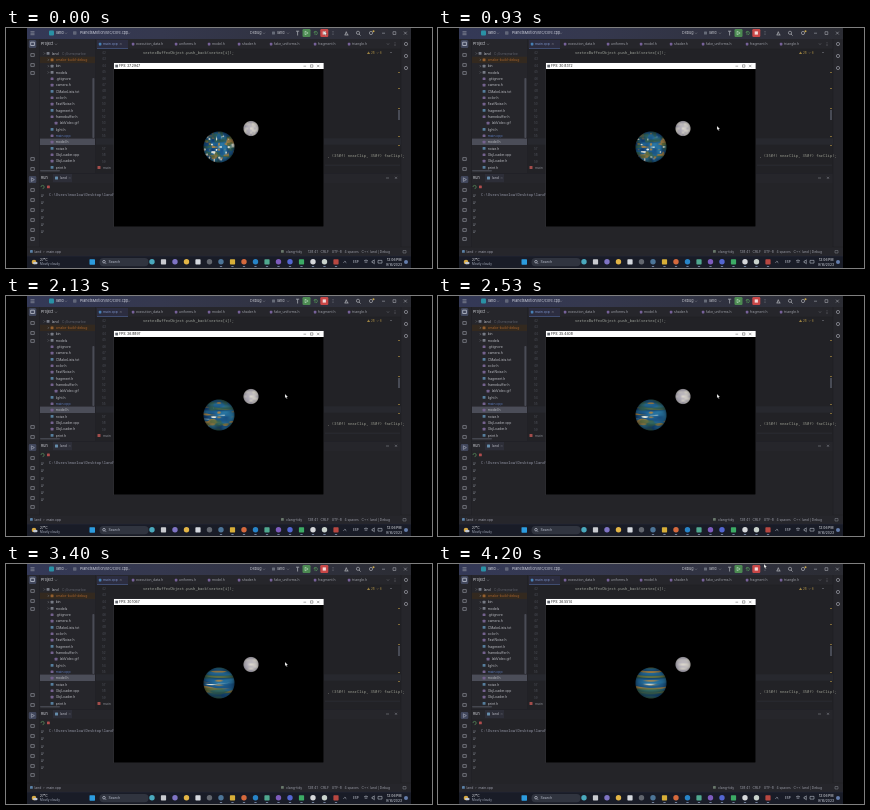
An HTML page with a canvas for the animation above (4.27 s loop, 426x240 px).

```html
<!DOCTYPE html>
<html lang="en">
<head>
<meta charset="utf-8">
<title>Planet demo</title>
<style>
html, body { margin: 0; width: 100%; height: 100%; overflow: hidden; background: #000; }
svg, canvas { position: absolute; left: 0; top: 0; display: block; width: 426px; height: 240px; }
text { font-family: Inter, "Open Sans", sans-serif; font-size: 3.4px; fill: #a4a6ae; white-space: pre; }
.code { font-family: "Noto Sans Mono", "DejaVu Sans Mono", monospace; font-size: 3.8px; }
#cursor { animation: roam 4.27s linear infinite; }
@keyframes roam {
  0%, 3% { transform: translate(318px, 3px); animation-timing-function: ease-in-out; }
  15%, 88% { transform: translate(279px, 98px); animation-timing-function: ease-in-out; }
  97%, 100% { transform: translate(326px, 0); }
}
</style>
</head>
<body>
<svg id="desk" viewBox="0 0 426 240">
  <defs>
    <linearGradient id="bar">
      <stop offset="0" stop-color="#343957"/>
      <stop offset=".35" stop-color="#35384e"/>
      <stop offset="1" stop-color="#2b2c33"/>
    </linearGradient>
  </defs>
  <g id="ide"></g>
  <g id="app">
    <rect x="107.5" y="34.7" width="210.5" height="164.3" fill="#303035"/>
    <rect x="108" y="35" width="209.6" height="6" fill="#fff"/>
    <rect x="108" y="41" width="209.6" height="157.6" fill="#000"/>
    <rect x="109.3" y="36.7" width="2.7" height="2.7" fill="#62666e"/>
    <text id="fps" x="113" y="39.4" style="fill:#222"></text>
    <path d="M297.5 38.2h2.6M304.5 36.8h2.4v2.4h-2.4zM311 36.8l2.4 2.4m0-2.4l-2.4 2.4" fill="none" stroke="#444" stroke-width=".45"/>
  </g>
</svg>
<canvas id="sky" width="852" height="480"></canvas>
<svg viewBox="0 0 426 240">
  <path id="cursor" d="M0 0v4.1l1-.9.7 1.5.7-.3-.7-1.5h1.3z" fill="#fff" stroke="#222" stroke-width=".25"/>
</svg>
<script>
const LOOP = 4270, STEPS = 64;
const ide = document.getElementById('ide');

function add(tag, attrs, body) {
  const el = document.createElementNS('http://www.w3.org/2000/svg', tag);
  for (const key in attrs) el.setAttribute(key, attrs[key]);
  if (body) el.textContent = body;
  ide.append(el);
  return el;
}
const box = (x, y, width, height, fill, rx = 0) => add('rect', { x, y, width, height, fill, rx });
const dot = (cx, cy, r, fill) => add('circle', { cx, cy, r, fill });
const ring = (cx, cy, r, stroke = '#b3b5bb') =>
  add('circle', { cx, cy, r, stroke, fill: 'none', 'stroke-width': .65 });
const line = (d, stroke = '#8c8e96', width = .6) =>
  add('path', { d, stroke, 'stroke-width': width, fill: 'none' });
const label = (x, y, words, fill = '#a4a6ae', size = 3.4) =>
  add('text', { x, y, style: `fill:${fill};font-size:${size}px` }, words);
const code = (x, y, words, fill = '#8d9098') =>
  add('text', { x, y, class: 'code', style: `fill:${fill}` }, words);
const chevron = (x, y) => line(`M${x} ${y}l1 1l1-1`, '#85878f', .5);

function drawFrame() {
  box(21, 0, 384, 240, '#26262b');
  box(90, 21, 305, 124, '#222226');
  box(34, 155, 361, 63, '#242428');
  box(21, 0, 384, 11, 'url(#bar)');
  line('M33.5 11V219M395 11V219M89.5 11V145M33 145.5H395M21 219H405M90 21H395', '#1d1d23', .5);
}

function drawTopBar() {
  line('M24.5 3.7h4M24.5 5.2h4M24.5 6.7h4', '#b2b4bc', .5);
  box(43, 2.5, 5, 5, '#2a91a5', 1);
  label(50, 6.4, 'land', '#d0d2da', 3.8);
  chevron(59, 4.7);
  box(67, 3.2, 3.5, 3.5, '#616679', .6);
  label(74, 6.4, 'PlanetsMotion/src/core.cpp', '#cdd0dc', 3.7);
  chevron(122, 4.7);
  label(244, 6.3, 'Debug', '#c5c7ce', 3.7);
  chevron(257, 4.7);
  box(266, 3.4, 3, 3, '#666b78', .5);
  label(271, 6.3, 'land', '#c5c7ce', 3.7);
  chevron(281, 4.7);
  line('M290 3.2h3.2M291.6 3.2v4.3', '#a8aab2', .8);
  box(296.5, 1, 8, 8, '#4c8a52', 1.2);
  line('M299.1 3.2v3.6l3-1.8z', '#d7eeda', .5);
  line('M308 5a1.7 1.7 0 1 1 1.8 1.8M309 3v4', '#58a25d', .6);
  box(314.3, 1, 8, 8, '#c94747', 1.2);
  box(316.7, 3.4, 3.2, 3.2, '#f4dcdc');
  for (const y of [3.5, 5, 6.5]) dot(327, y, .4, '#9a9ca4');
  line('M339 7l1.3-3.3 1.3 3.3M338.5 7h4M353 6l1.6 1.6', '#b3b5bb', .7);
  ring(352, 4.8, 1.6);
  ring(365, 5, 1.6);
  dot(367.5, 3.2, 1, '#c9a84a');
  line('M376 5.2h3M387 3.7h2.8v2.8H387zM398 3.7l2.8 2.8m0-2.8l-2.8 2.8', '#b9bbc2', .5);
}

function drawTabs() {
  label(35, 17.3, 'Project', '#d0d2d8', 3.7);
  chevron(49, 15.7);
  box(91, 12, 31, 9, '#2c2d40');
  box(91, 20.2, 31, .8, '#45557c');
  const tabs = [[97, 'main.cpp'], [130, 'execution_data.h'], [173, 'uniforms.h'], [206, 'model.h'],
    [236, 'shader.h'], [268, 'fake_uniforms.h'], [312, 'fragment.h'], [346, 'triangle.h']];
  tabs.forEach(([x, name], i) => {
    box(x - 4.2, 14.8, 2.6, 2.6, i ? '#77629a' : '#4781b6', .6);
    label(x, 17.2, name, i ? '#9a9ca4' : '#7a92c8');
  });
  line('M114 15.2l1.5 1.5m0-1.5l-1.5 1.5', '#8b8d96', .4);
  chevron(381, 15.5);
  for (const y of [14.8, 16.2, 17.6]) dot(389, y, .4, '#9a9ca4');
}

function drawTree() {
  const names = ['land', 'cmake-build-debug', 'bin', 'models', '.gitignore', 'camera.h', 'CMakeLists.txt',
    'color.h', 'FastNoise.h', 'fragment.h', 'framebuffer.h', 'labVideo.gif', 'light.h', 'main.cpp',
    'model.h', 'noise.h', 'ObjLoader.cpp', 'ObjLoader.h', 'print.h'];
  box(34, 28.7, 55, 6.4, '#33291f');
  box(34, 110.6, 55, 6.4, '#4b4d58');
  names.forEach((name, i) => {
    const y = 25.5 + i * 6.33;
    const x = i === 0 ? 41 : name === 'labVideo.gif' ? 49 : 45;
    const folder = i < 4;
    box(x - .4, y - 1.4, 2.9, 2.7, i === 1 ? '#94602f' : folder ? '#777b85' : i % 3 ? '#74628e' : '#567d9b', .5);
    if (folder) line(`M${x - 3.2} ${y - 1}l1 1l-1 1`, '#85878f', .5);
    label(x + 4.7, y + 1.2, name, i === 1 ? '#a3622c' : i === 13 ? '#5a78b8' : '#b6b8be');
  });
  label(56, 26.7, 'C:\\Users\\marlow', '#64666f', 3);
  box(86.4, 50, 2, 60, '#4a4c56', .8);
  box(34, 142, 20, 1.6, '#44464f', .8);
}

function drawEditor() {
  code(137, 25.8, 'vertexBufferObject.push_back(vertex[i]);', '#a0a59c');
  for (let i = 0; i < 18; i++) label(96, 26 + i * 6.4, String(42 + i), '#4f525b', 3);
  box(90, 110.3, 305, 6.4, '#27282e');
  code(319, 129.4, ' , (350f) nearClip, 350f) farClip);', '#9a9c90');
  box(91.5, 138, 3, 3, '#a34d4b', .5);
  label(97, 141, 'main', '#85878f');
  line('M319 137.2h75', '#34363e', .5);
  label(361, 25.7, '⚠ 28  ✓ 6', '#af9146', 3);
  chevron(384, 24);
  for (const y of [44, 60, 80, 108, 117]) box(392, y, 2, .8, '#967c3d');
  box(392, 82, 2, 10, '#484b55');
}

function drawRun() {
  label(35, 151.3, 'Run', '#d0d2d8', 3.7);
  box(47, 146, 19, 8.2, '#2d2e38');
  box(49, 148.5, 3, 3, '#658cab', .5);
  label(54, 151.2, 'land', '#b7b9c3');
  line('M63 149.3l1.3 1.3m0-1.3l-1.3 1.3', '#777982', .4);
  line('M35 159a1.6 1.6 0 1 1 1.6 1.6', '#63a267', .6);
  box(41, 157.5, 2.8, 2.8, '#b14d4d', .4);
  code(43, 167.5, 'C:\\Users\\marlow\\Desktop\\land\\cmake-build-debug\\land.exe', '#9598a8');
  for (const y of [167, 174, 182, 189, 196, 203]) line(`M35 ${y}h3m-3 1.4h2`, '#7b7e87', .6);
  line('M380 150h3M389 148.8l2 2m0-2l-2 2', '#92949c', .5);
}

function drawRails() {
  box(22.8, 12, 7.5, 8, '#41475c', 1.5);
  line('M24.7 14.2h3.7v3.3h-3.7z', '#cbd0dc', .7);
  for (const y of [27, 37, 45, 131, 141, 162, 172, 182, 192, 202, 211])
    line(`M24.8 ${y - 1.4}h3.5v2.8h-3.5z`, '#94969f', .65);
  box(22.8, 148.1, 7.5, 7, '#41475c', 1.3);
  line('M25.4 149.8v3.6l3-1.8z', '#c0c4cf', .5);
  for (const y of [16, 28, 40]) ring(400, y, 1.6, '#a6a8b0');
}

function drawStatus() {
  box(24, 222, 2.8, 2.8, '#5b81a6', .4);
  label(28.5, 224.8, 'land  ›  main.cpp', '#9c9eaa');
  box(275, 222, 2.8, 2.8, '#68776a', .6);
  label(280, 224.8, 'clang-tidy', '#9a9ca6');
  label(302, 224.8, '128:41   CRLF   UTF-8   4 spaces   C++: land | Debug', '#9a9ca6', 3.3);
  line('M397 222.5h3v2.5h-3z', '#868891', .5);
}

function drawTaskbar() {
  box(21, 228, 384, 12, '#191c27');
  line('M21 228.2H405', '#2b2f40', .4);
  dot(28, 234, 2.3, '#d7aa46');
  box(27, 234, 4.6, 2.2, '#c2c9d5', 1.1);
  label(34, 233.4, '27°C', '#eef0f5', 3.2);
  label(34, 237.3, 'Mostly cloudy', '#a8afbf', 3);
  box(83.5, 231.2, 5.5, 5.5, '#2c9cdf', .6);
  box(93.5, 230, 49, 8.2, '#30343f', 4);
  ring(98, 233.7, 1.3, '#c9cedb');
  line('M99 234.7l1.2 1.2', '#c9cedb', .5);
  label(102.5, 235.3, 'Search', '#b2b8c6', 3.5);
  const icons = ['#4aa9bd', '#c9cbd0', '#7f74c4', '#e3b546', '#d5d9df', '#62666e', '#4c7598', '#d7ae38',
    '#d5693d', '#2784c8', '#50a990', '#7d5bbd', '#5366d1', '#3cab65', '#d5d7da', '#c9d2cc', '#b84741'];
  icons.forEach((fill, i) => {
    const x = 146 + i * 11.5;
    if (i % 3 === 1) box(x - 2.6, 231.2, 5.2, 5.2, fill, .7);
    else dot(x, 233.8, 2.7, fill);
    if (i > 5) box(x - 1.2, 238, 2.4, .7, '#889bbd', .3);
  });
  line('M337.5 234.7l1.4-1.4 1.4 1.4', '#cfd4df', .6);
  label(347, 235.1, 'ESP', '#cfd4df', 3);
  line('M358 233q2-2 4 0m-3.2 1.4q1.2-1 2.4 0', '#cfd4df', .6);
  line('M366 233h1l1.3-1.2v4l-1.3-1.2h-1zM372 232.4h4v2.7h-4z', '#cfd4df', .5);
  label(381, 233.4, '12:06 PM', '#eef0f5', 3.3);
  label(380, 237.5, '9/16/2023', '#d1d6e0', 3.3);
  dot(400, 234, 2, '#657dab');
}

[drawFrame, drawTopBar, drawTabs, drawTree, drawEditor, drawRun, drawRails, drawStatus, drawTaskbar]
  .forEach(draw => draw());

const ctx = document.getElementById('sky').getContext('2d');
const clamp = v => Math.max(0, Math.min(1, v));
const mix = (a, b, k) => a.map((v, i) => v + (b[i] - v) * k);
const ramp = (v, from, to) => clamp((v - from) / (to - from));
const bump = (v, at, width) => Math.exp(-(((v - at) / width) ** 2));

function hash(x, y, seed) {
  const s = Math.sin(x * 127.1 + y * 311.7 + seed * 74.7) * 43758.5453;
  return s - Math.floor(s);
}
function noise(x, y, seed) {
  const ix = Math.floor(x), iy = Math.floor(y);
  let u = x - ix, v = y - iy;
  u *= u * (3 - 2 * u);
  v *= v * (3 - 2 * v);
  const a = hash(ix, iy, seed), b = hash(ix + 1, iy, seed);
  const c = hash(ix, iy + 1, seed), d = hash(ix + 1, iy + 1, seed);
  return a + (b - a) * u + (c - a) * v + (a - b - c + d) * u * v;
}

// The noise stretches along x as p runs from 0 to 1.
function planetColor(x, y, z, p) {
  const sx = 4.6 * (1 - p) ** 1.4 + .5;
  const sy = 5 + p * 1.5;
  const bend = y + p * .1 * x * x;
  const sea = noise(x * sx + 7, bend * sy + 3, 1);
  const bands = p * .4 * (bump(bend, -.72, .08) + bump(bend, -.38, .07) + bump(bend, .34, .08) + bump(bend, .62, .08));
  const land = noise(x * sx + 2, bend * sy * 1.1 + 9, 2) + bands - p * .08;
  const streak = p * bump(y - .12 + p * .18 * x * x, 0, .09) * bump(x, -.05, .7);
  const cloud = noise(x * sx * 1.3 + 4, bend * sy * 1.2 + 5, 5) * (1 - p * .35) + streak * .75;
  let c = mix([14, 58, 112], [44, 126, 170], sea);
  c = mix(c, [176, 134, 66], ramp(land, .6, .76) * .9);
  c = mix(c, [60, 104, 62], ramp(noise(x * sx + 8, y * 5, 9), .64, .8) * .6);
  c = mix(c, [232, 234, 222], ramp(cloud, .73, .87));
  const light = .2 + .82 * Math.sqrt(z);
  return c.map(v => v * light);
}

function moonColor(x, y, z, p) {
  const sx = 3 * (1 - p) + 1;
  const n = noise(x * sx + 6, y * 3.5 + 2, 4);
  const c = mix([166, 162, 180], [222, 218, 206], n);
  const light = .42 + .58 * Math.sqrt(z);
  return c.map(v => v * light);
}

function sphere(cx, cy, radius, color, p) {
  const r = radius * 2, size = Math.ceil(r) * 2 + 4, mid = size / 2;
  const img = ctx.createImageData(size, size);
  for (let j = 0; j < size; j++) {
    for (let i = 0; i < size; i++) {
      const x = (i + .5 - mid) / r, y = (j + .5 - mid) / r;
      const d = Math.hypot(x, y);
      const alpha = clamp((1 - d) * r + .5);
      if (!alpha) continue;
      const z = Math.sqrt(Math.max(0, 1 - d * d));
      img.data.set([...color(x, y, z, p), alpha * 255], (j * size + i) * 4);
    }
  }
  ctx.putImageData(img, Math.round(cx * 2 - mid), Math.round(cy * 2 - mid));
}

const fps = document.getElementById('fps');
let shown = -1;
function tick() {
  const step = Math.floor((performance.now() % LOOP) / LOOP * STEPS);
  if (step !== shown) {
    shown = step;
    const p = step / (STEPS - 1);
    sphere(213, 119, 15.6, planetColor, p);
    sphere(245, 100.3, 7.6, moonColor, p);
    fps.textContent = 'FPS: ' + (24 + hash(Math.floor(step / 4), 1, 3) * 9).toFixed(4);
  }
  requestAnimationFrame(tick);
}
tick();
</script>
</body>
</html>
```
